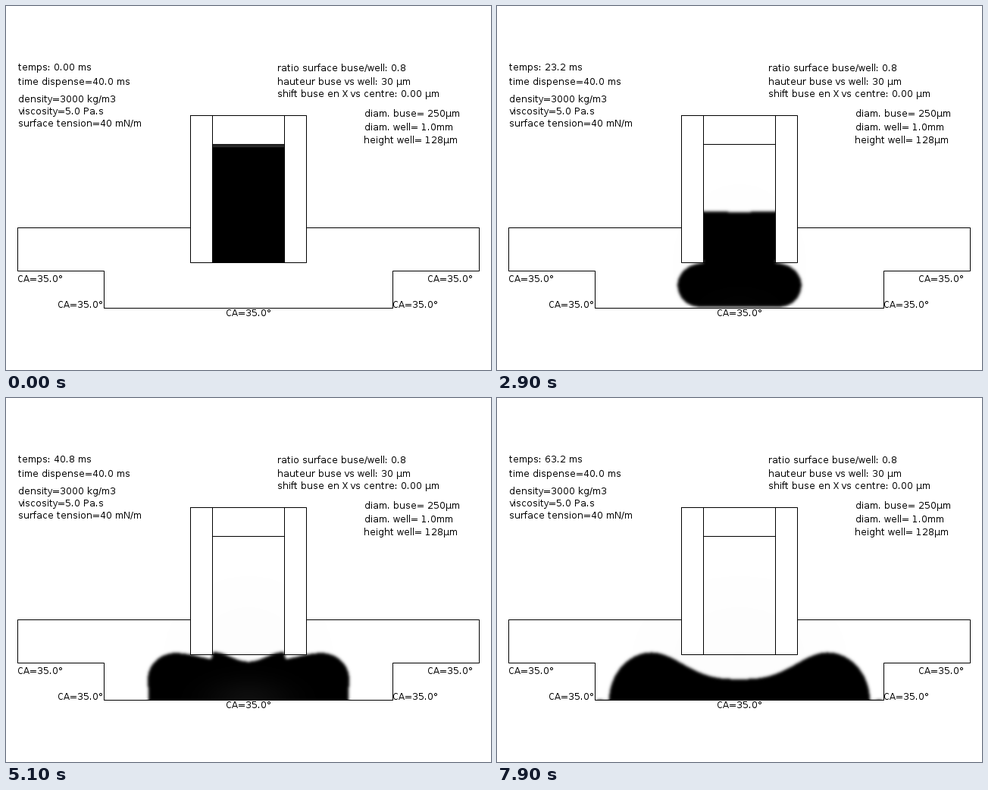
Recreate the animation shown at these times as a matplotlib script. Size 640 by 480 pixels, loop 8 s.

```python
import numpy as np
import matplotlib.pyplot as plt
from matplotlib.animation import FuncAnimation
from matplotlib.path import Path

W, H, DPI = 640, 480, 100
FRAMES, STEP = 80, 100
CX, TOP, FLOOR, LIP = 320, 182, 398, 338
BORE, NOZZLE = 47.5, 76
HALF, PAD = 190, 12

plt.rcParams.update({"font.family": "DejaVu Sans",
                     "text.hinting": "native", "text.hinting_factor": 1})

# Right half of the stage around the axis, with a margin for the blur
xs = np.arange(-PAD, HALF + PAD) + 0.5
ys = np.arange(TOP - PAD, FLOOR + PAD) + 0.5
X, Y = np.meshgrid(xs, ys)
PIXELS = np.column_stack([X.ravel(), Y.ravel()])
IN_BORE = (X < BORE) & (Y < LIP)
DOMAIN = IN_BORE | (Y >= LIP) | ((X > NOZZLE) & (Y > 292))


def blur_matrix(n, sigma=1.9):
    i = np.arange(n)
    k = np.exp(-((i[:, None] - i) / sigma) ** 2 / 2)
    return k / k.sum(axis=1, keepdims=True)


BLUR_Y, BLUR_X = blur_matrix(len(ys)), blur_matrix(len(xs)).T


def swell(u):
    """Cosine hump: 1 at u = 0, 0 at u = 1."""
    return (1 + np.cos(np.pi * np.clip(u, 0, 1))) / 2


def bore_surface(x, t):
    """Meniscus sinking in the nozzle; its middle sags near the end."""
    sag = 4 * max(t - 2.7, 0)
    return TOP + 0.5 + 30.5 * t + sag * (4 * swell(x / BORE) - 1) / 3


def outline(t):
    """Half profile of the liquid, from the axis over the lobe to the floor."""
    late = max(t - 5, 0)
    wide = max(BORE + 1.8 * t, 58.5 + 118 * np.sin(0.22 * (t - 2)))
    belly = max(LIP, 371 - 83 * np.exp(-1.15 * t)) + 15 * max(t - 6, 0)
    base = FLOOR - 60 * np.exp(-t ** 1.25)
    crest_x = max(BORE, wide - 36 - 7 * late)
    crest_y = min(belly, 339 - 7.5 * np.exp(-((t - 6.6) / 1.5) ** 2))
    dish = 371 - 26 * np.exp(-1.5 * late)

    x = np.linspace(0, crest_x, 50)
    y = crest_y + (dish - crest_y) * swell((x / crest_x) ** 1.4)
    y = np.where(x <= BORE, np.minimum(y, bore_surface(x, t)), y)

    a = np.linspace(0, np.pi / 2, 24)
    upper = np.column_stack([crest_x + (wide - crest_x) * np.sin(a),
                             belly - (belly - crest_y) * np.cos(a)])

    # The underside is round until it wets the floor, then only a neck is left
    tuck = min(wide - 26 * max(t - 0.85, 0),
               2.2 * (7.9 - t) + 24 * np.exp(-3 * (t - 2.9)))
    foot = 5 * np.clip(t - 3, 0, 1)
    low_y = belly + (base - belly) * np.sin(a)
    low_x = wide - tuck * (1 - np.cos(a)) + foot * np.exp((low_y - FLOOR) / 4)
    end = base + PAD * np.clip(5 * (t - 2.9), 0, 1)
    return np.vstack([(-60, y[0]), np.column_stack([x, y]), upper,
                      np.column_stack([low_x, low_y]),
                      (low_x[-1], end), (-60, end)])


def liquid(t):
    """Grey levels of the fluid region."""
    mask = Path(outline(t)).contains_points(PIXELS).reshape(X.shape)
    # Carry the column into the wall so that it stays solid beside it
    mask |= (abs(X - BORE) < 7) & (Y > bore_surface(X, t)) & (Y < LIP - 3)
    mask = mask.astype(float)
    if t > 0:
        mask = BLUR_Y @ mask @ BLUR_X
    halo = (3 * min(t, 1)
            * np.exp(-(X / (55 + 10 * t)) ** 2 - ((Y - 340) / 100) ** 2))
    glow = 30 * np.exp(-((t - 4.3) / 0.9) ** 2
                       - (X / 55) ** 2 - ((FLOOR - Y) / 28) ** 2)
    grey = (1 - mask) * (255 - halo) + mask * glow
    if t == 0:
        grey[IN_BORE & (Y > TOP) & (Y < TOP + 4) & (Y // 1 % 2 == 1)] = 75
    grey = np.where(DOMAIN, grey, 255)[PAD:-PAD, PAD:-PAD]
    return np.hstack([grey[:, ::-1], grey])


fig = plt.figure(figsize=(W / DPI, H / DPI), dpi=DPI, facecolor="white")
ax = fig.add_axes([0, 0, 1, 1])
ax.axis("off")

image = ax.imshow(liquid(0), cmap="gray", vmin=0, vmax=255, aspect="auto",
                  interpolation="nearest",
                  extent=(CX - HALF, CX + HALF, FLOOR, TOP))
ax.set_xlim(0, W)
ax.set_ylim(H, 0)


def line(*pts):
    ax.plot(*zip(*pts), color="black", lw=0.72, snap=True,
            solid_capstyle="projecting", solid_joinstyle="miter")


line((243, 144), (396, 144), (396, LIP), (243, LIP), (243, 144))
for x in (272, 367):
    line((x, 144), (x, LIP))
line((272, TOP), (367, TOP))
line((243, 292), (15, 292), (15, 349), (129, 349), (129, FLOOR), (510, FLOOR),
     (510, 349), (624, 349), (624, 292), (396, 292))


def label(x, y, s):
    return ax.text(x, y, s, fontsize=8.64, color="black", va="baseline")


clock = label(16, 85, "")
for x, y, s in [
    (16, 104, "time dispense=40.0 ms"),
    (16, 127, "density=3000 kg/m3"),
    (16, 143, "viscosity=5.0 Pa.s"),
    (16, 159, "surface tension=40 mN/m"),
    (358, 86, "ratio surface buse/well: 0.8"),
    (358, 104, "hauteur buse vs well: 30 µm"),
    (358, 120, "shift buse en X vs centre: 0.00 µm"),
    (473, 146, "diam. buse= 250µm"),
    (473, 164, "diam. well= 1.0mm"),
    (472, 181, "height well= 128µm"),
]:
    label(x, y, s)
for x, y in [(15, 364), (68, 398), (290, 409), (510, 398), (556, 364)]:
    label(x, y, "CA=35.0°")


def update(i):
    image.set_data(liquid(i * STEP / 1000))
    clock.set_text(f"temps: {i * 0.8:#.3g} ms")
    return image, clock


anim = FuncAnimation(fig, update, frames=FRAMES, interval=STEP,
                     repeat=True, repeat_delay=0, blit=False)
plt.show()
```
